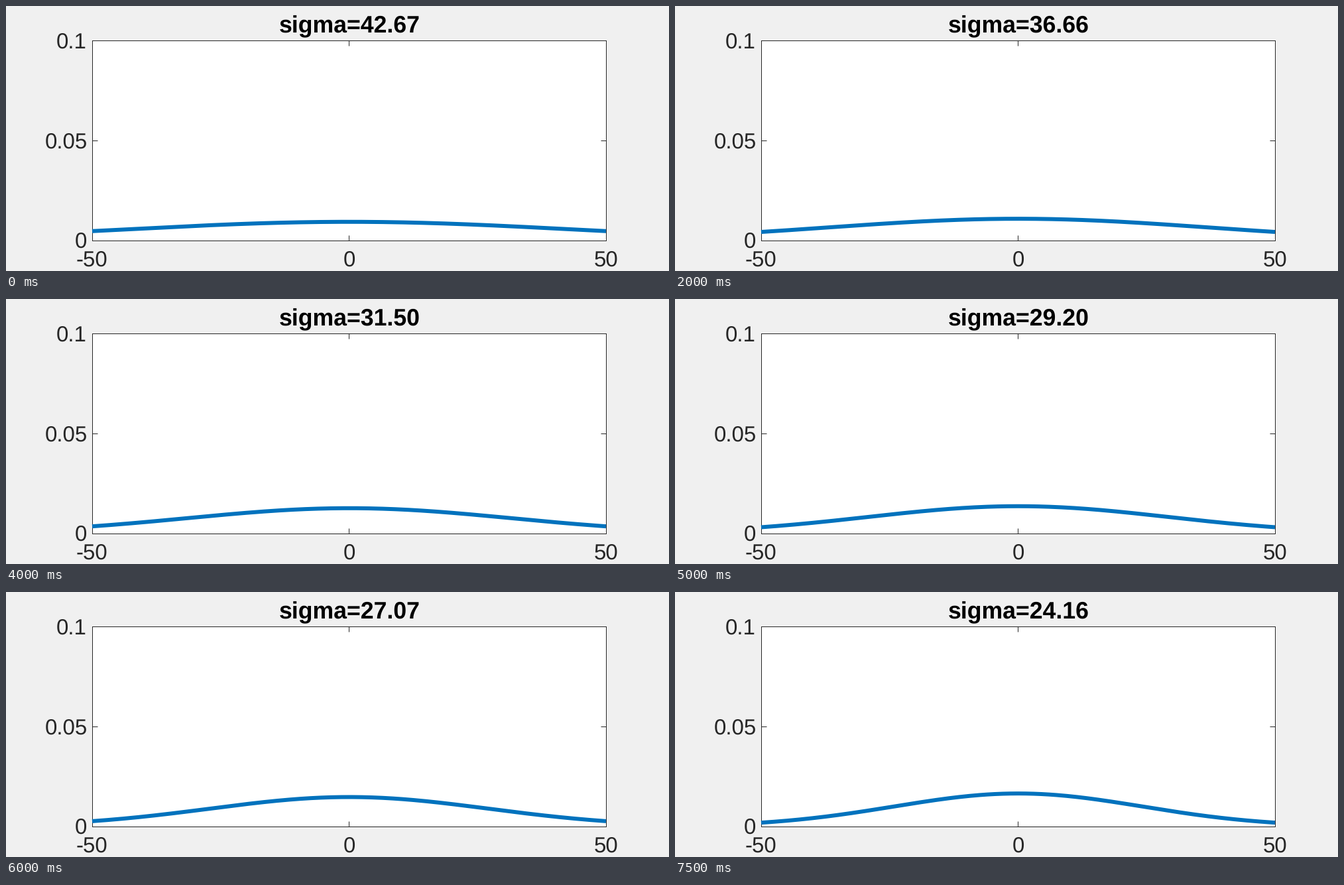
These frames come from a looping animation (1000x400 px, 8000 ms). A matplotlib script:

```python
import numpy as np
import matplotlib.pyplot as plt
from matplotlib.animation import FuncAnimation
from matplotlib.patches import Rectangle

W, H, DPI = 1000, 400, 100
PX = 72 / DPI  # points per pixel
FRAMES, STEP_MS = 16, 500

LEFT, RIGHT, TOP, BOTTOM = 130, 905, 52, 354
MID_X, MID_Y = 517, 203
X_MAX, Y_MAX = 50, 0.1
TICK = 7.5
INK, BLUE, GREY = "#262626", "#0072BD", "#F0F0F0"
START_SIGMA, STEPS = 128 / 3, 99

plt.rcParams["font.family"] = "Liberation Sans"
plt.rcParams["text.hinting"] = "none"

fig = plt.figure(figsize=(W / DPI, H / DPI), dpi=DPI, facecolor=GREY)
ax = fig.add_axes([0, 0, 1, 1])
ax.set(xlim=(0, W), ylim=(H, 0))
ax.axis("off")


def bar(x, y, w, h, color=INK, z=2):
    ax.add_patch(Rectangle((x, y), w, h, fc=color, ec="none", lw=0,
                           zorder=z, snap=False))


def label(x, base, text, size=33, **style):
    return ax.text(x, base, text, fontsize=size * PX, ha="left",
                   va="baseline", **{"color": INK, **style})


def sigma_at(i):
    """Geometric decay that reaches 1 after STEPS steps."""
    return START_SIGMA ** (1 - i / STEPS)


def bell(x, sigma):
    return np.exp(-x**2 / (2 * sigma**2)) / (sigma * np.sqrt(2 * np.pi))


# Plot area, one-pixel frame and inward ticks
width, height = RIGHT - LEFT, BOTTOM - TOP
bar(LEFT, TOP, width + 1, height + 1, "white", 1)
for y in (TOP, BOTTOM):
    bar(LEFT, y, width + 1, 1)
for x in (LEFT, RIGHT):
    bar(x, TOP, 1, height + 1)
for y in (TOP + 1, BOTTOM - TICK):
    bar(MID_X, y, 1, TICK)
for x in (LEFT + 1, RIGHT - TICK):
    bar(x, MID_Y, TICK, 1)

label(76, 64, "0.1")
label(58.6, 215, "0.05")
label(104, 365, "0")
label(105.6, 393, "-50")
label(508.6, 393, "0")
label(887, 393, "50")
title = label(411.6, 39, "", size=35.6, weight="bold", color="black")

xs = np.linspace(-X_MAX, X_MAX, 201)
px = (LEFT + RIGHT) / 2 + xs * width / (2 * X_MAX)
curve, = ax.plot([], [], color=BLUE, lw=6 * PX, zorder=3, snap=False,
                 solid_capstyle="butt", solid_joinstyle="round")


def draw(i):
    sigma = sigma_at(i)
    curve.set_data(px, BOTTOM - bell(xs, sigma) * height / Y_MAX)
    title.set_text(f"sigma={sigma:.2f}")
    return curve, title


anim = FuncAnimation(fig, draw, frames=FRAMES, interval=STEP_MS,
                     init_func=lambda: draw(0), repeat=True, repeat_delay=0)
plt.show()
```
